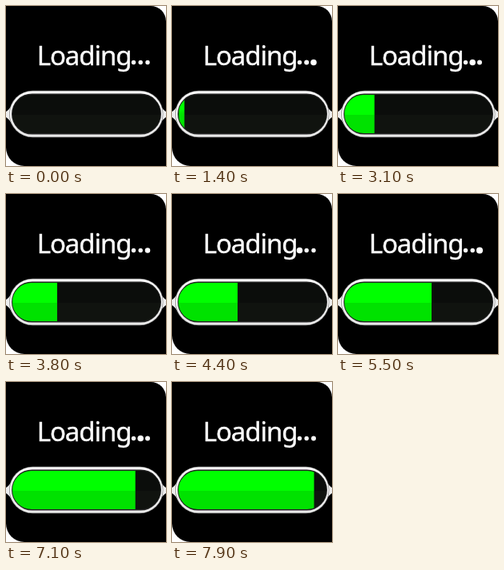
Write an HTML page that moves like this. It is 200 px wide and 200 px high and loops after 8000 ms.

```html
<!DOCTYPE html>
<html lang="en">
<head>
<meta charset="utf-8">
<title>Loading</title>
<style>
  html, body { margin: 0; width: 100%; height: 100%; overflow: hidden; background: #fff; }
  svg { display: block; width: 100%; height: 100%; }
  text {
    font: 33px "Noto Sans", "Open Sans", sans-serif;
    letter-spacing: -1.1px;
    fill: #fff;
    stroke: #fff;
    stroke-width: .4px;
  }
  .dot { fill: #fff; transform-box: fill-box; transform-origin: center; }
</style>
</head>
<body>
<svg viewBox="0 0 200 200">
  <defs>
    <clipPath id="tube"><rect x="8" y="111" width="185" height="48" rx="24"/></clipPath>
    <linearGradient id="rim" x1="0" y1="0" x2="0" y2="1">
      <stop offset="0" stop-color="#fff"/>
      <stop offset="1" stop-color="#e8e8e8"/>
    </linearGradient>
  </defs>

  <path d="M0 0H181A19 19 0 0 1 200 19V200H23A23 23 0 0 1 0 177Z"/>
  <text x="38.8" y="73.5">Loading</text>
  <circle class="dot" cx="159.5" cy="70.5" r="2.7"/>
  <circle class="dot" cx="168.2" cy="70.5" r="2.7"/>
  <circle class="dot" cx="177" cy="70.5" r="2.7"/>

  <path d="M8 122Q4 130 0 132V139Q4 141 8 149ZM192 122Q196 130 200 132V139Q196 141 192 149Z" fill="#eee"/>
  <rect x="4" y="105.7" width="192.5" height="58.6" rx="29.3" fill="#888"/>
  <rect x="4.7" y="106.4" width="191.1" height="57.2" rx="28.6" fill="url(#rim)"/>
  <rect x="7" y="109.4" width="187" height="51.2" rx="25.6" fill="#222"/>
  <g clip-path="url(#tube)">
    <path d="M8 111H193V136H8Z" fill="#0b0d0b"/>
    <path d="M8 136H193V160H8Z" fill="#10130f"/>
    <g id="fill">
      <path d="M8 111H194V136H8Z" fill="#0f0"/>
      <path d="M8 136H194V160H8Z" fill="#00e200"/>
    </g>
  </g>
</svg>
<script>
  const LOOP = 8000, STEP = 100, PULSE = 2000;

  const fill = document.getElementById('fill');
  fill.style.transformOrigin = '8px 0';
  const progress = fill.animate(
    { transform: ['translateX(.4px) scaleX(0)', 'translateX(.4px) scaleX(1)'] },
    { duration: 10000, easing: 'ease-in-out', fill: 'both' }
  );
  progress.pause();

  // Each dot swells for half a pulse, a quarter pulse after its neighbour.
  const dots = [...document.querySelectorAll('.dot')];
  const swell = phase => Math.max(0, Math.min(phase, 0.5 - phase)) * 4;

  const start = performance.now();
  function draw(now) {
    const t = Math.floor((Math.max(0, now - start) % LOOP) / STEP) * STEP;
    progress.currentTime = t;
    dots.forEach((dot, i) => {
      const size = 1 + 0.5 * swell((t % PULSE) / PULSE - i / 4);
      dot.style.transform = `scale(${size})`;
    });
    requestAnimationFrame(draw);
  }
  draw(start);
</script>
</body>
</html>
```
